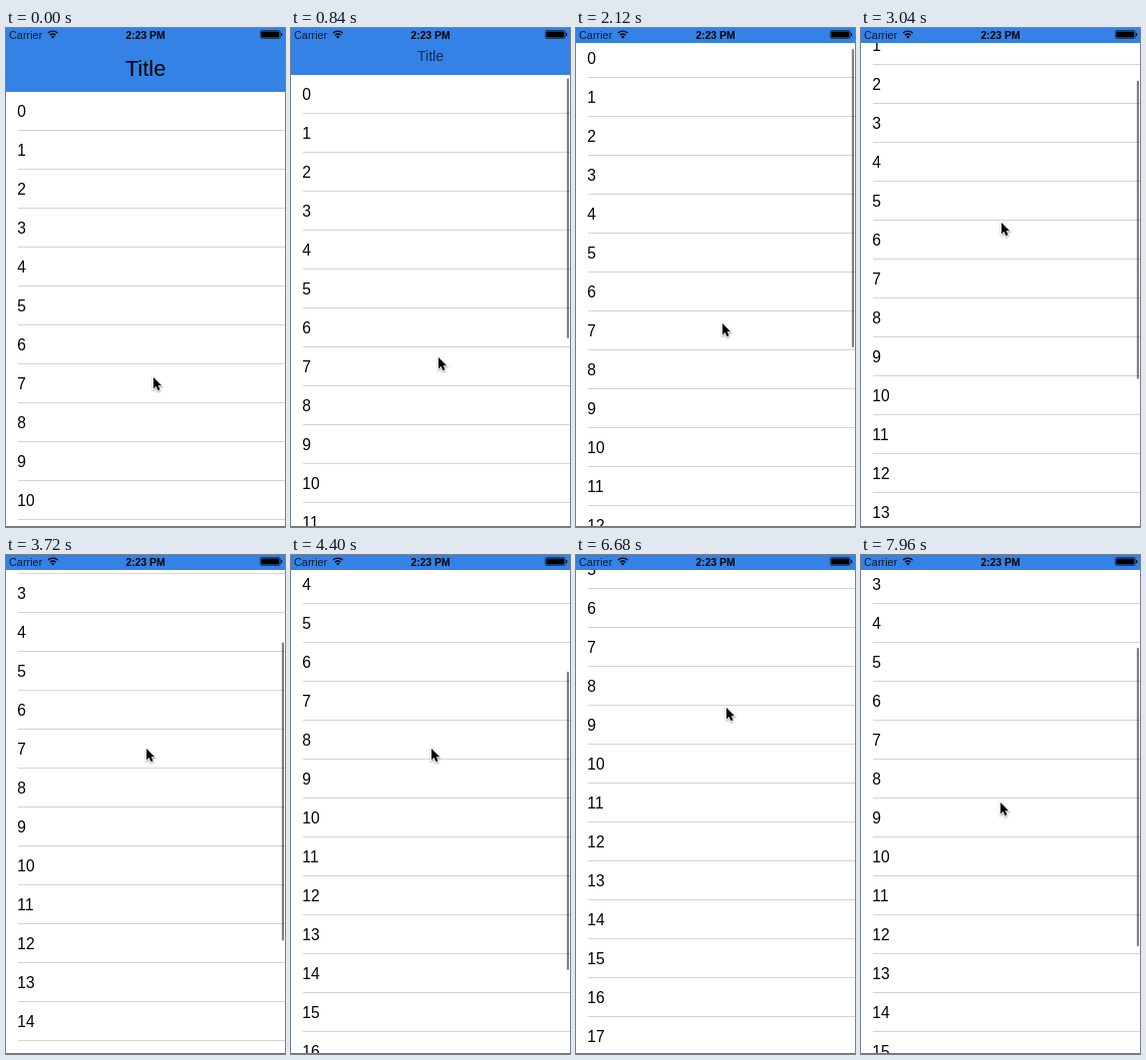
An HTML page with a canvas that plays this animation: 280 px wide and 500 px high, repeating every 8000 ms.

```html
<!DOCTYPE html>
<html lang="en">
<head>
<meta charset="utf-8">
<title>Collapsing title bar</title>
<style>
  html, body { margin: 0; width: 100%; height: 100%; overflow: hidden; background: #fff; }
  canvas { display: block; width: 280px; height: 500px; }
</style>
</head>
<body>
<canvas id="stage" width="280" height="500"></canvas>
<script>
const ctx = document.getElementById('stage').getContext('2d');
const WIDTH = 280, HEIGHT = 500, LOOP = 8000, STEP = 40;
const BAR_MAX = 64, BAR_MIN = 15, COLLAPSE = BAR_MAX - BAR_MIN;
const ROWS = 20, ROW_HEIGHT = 39;
const FONT = '"Liberation Sans", Arial, sans-serif';
const BLUE = '#3482e6';

// Each key: time, list scroll, pointer x, pointer y
const KEYS = [
  [0, 0, 148, 350], [840, 17, 148, 330], [2120, 53, 147, 296],
  [3040, 105, 141, 195], [4400, 210, 141, 194], [5440, 239, 151, 153],
  [5840, 257, 151, 153], [6240, 264, 151, 153], [7000, 264, 151, 153],
  [7960, 171, 140, 248]
];

// Monotone cubic interpolation through one column of KEYS
function track(column) {
  const slopes = KEYS.slice(1).map((k, i) => (k[column] - KEYS[i][column]) / (k[0] - KEYS[i][0]));
  const tangents = KEYS.map((_, i) => {
    if (i === 0) return slopes[0];
    if (i === slopes.length) return slopes[i - 1];
    const a = slopes[i - 1], b = slopes[i];
    return a * b <= 0 ? 0 : 2 * a * b / (a + b);
  });
  return time => {
    let i = 0;
    while (i < slopes.length - 1 && time > KEYS[i + 1][0]) i++;
    const span = KEYS[i + 1][0] - KEYS[i][0];
    const u = Math.min(1, (time - KEYS[i][0]) / span), v = 1 - u;
    return KEYS[i][column] * v * v * (1 + 2 * u) + KEYS[i + 1][column] * u * u * (3 - 2 * u)
      + span * u * v * (tangents[i] * v - tangents[i + 1] * u);
  };
}
const scrollAt = track(1), pointerX = track(2), pointerY = track(3);

const clamp = (x, lo, hi) => Math.max(lo, Math.min(hi, x));

function label(text, x, y, font, align = 'left', color = '#000') {
  ctx.font = `${font} ${FONT}`;
  ctx.textAlign = align;
  ctx.fillStyle = color;
  ctx.fillText(text, x, y);
}

function roundBox(x, y, w, h, r) {
  ctx.beginPath();
  ctx.roundRect(x, y, w, h, r);
}

function drawList(scroll) {
  for (let i = 0; i < ROWS; i++) {
    const top = 63 + i * ROW_HEIGHT - scroll;
    if (top > HEIGHT || top < -ROW_HEIGHT) continue;
    label(i, 11.3, top + 26, '15.75px');
    ctx.fillStyle = '#d3d3d5';
    ctx.fillRect(12, top + ROW_HEIGHT, WIDTH - 12, 1);
  }
}

function drawIndicator(scroll, bar, time) {
  const shown = time < 6400 ? clamp(time / 80, 0, 1)
    : time < 7040 ? clamp((6680 - time) / 240, 0, 1) : 1;
  const view = HEIGHT - bar;
  const length = view * view / (ROWS * ROW_HEIGHT) - 2.5;
  ctx.fillStyle = `rgba(0,0,0,${0.5 * shown})`;
  roundBox(276.8, bar + 3.5 + Math.max(0, scroll - COLLAPSE) * 0.61, 2.2, length, 1.1);
  ctx.fill();
}

function drawStatus() {
  label('Carrier', 3, 10.5, '10.9px', 'left', '#071a30');
  label('2:23 PM', 140, 10.5, 'bold 10.5px', 'center');

  // Wi-Fi
  ctx.strokeStyle = '#000';
  ctx.lineWidth = 1.3;
  for (const r of [4, 6.9]) {
    ctx.beginPath();
    ctx.arc(47, 10, r, -Math.PI * 0.75, -Math.PI * 0.25);
    ctx.stroke();
  }
  ctx.fillStyle = '#000';
  ctx.beginPath();
  ctx.moveTo(47, 10.4);
  ctx.arc(47, 10.4, 2.4, -Math.PI * 0.75, -Math.PI * 0.25);
  ctx.fill();

  // Battery
  ctx.lineWidth = 0.6;
  roundBox(255.3, 2.6, 19.8, 7.8, 1.4);
  ctx.stroke();
  roundBox(256.2, 3.5, 18, 6, 0.8);
  ctx.fill();
  roundBox(275.9, 5, 1.2, 3, 0.6);
  ctx.fill();
}

function drawBar(scroll, bar) {
  ctx.fillStyle = BLUE;
  ctx.fillRect(0, 0, WIDTH, bar);
  const size = 1 - clamp(scroll / COLLAPSE, 0, 1);
  if (size > 0) {
    ctx.globalAlpha = size;
    label('Title', 140, 40.2 - 0.71 * scroll + 7.8 * size, `${22 * size}px`, 'center');
    ctx.globalAlpha = 1;
  }
  drawStatus();
}

const arrow = new Path2D('M0 0V11.4L2.6 8.9 4.5 13.2 6.6 12.3 4.8 8.2H8.2Z');
function drawPointer(x, y) {
  ctx.save();
  ctx.translate(x, y);
  ctx.shadowColor = 'rgba(0,0,0,.4)';
  ctx.shadowBlur = 2;
  ctx.shadowOffsetY = 1;
  ctx.strokeStyle = '#fff';
  ctx.lineWidth = 1.6;
  ctx.stroke(arrow);
  ctx.shadowColor = 'transparent';
  ctx.fillStyle = '#000';
  ctx.fill(arrow);
  ctx.restore();
}

function draw(now) {
  const time = Math.floor((now % LOOP) / STEP) * STEP;
  const scroll = Math.round(scrollAt(time));
  const bar = clamp(BAR_MAX - scroll, BAR_MIN, BAR_MAX);
  ctx.fillStyle = '#fff';
  ctx.fillRect(0, 0, WIDTH, HEIGHT);
  drawList(scroll);
  drawIndicator(scroll, bar, time);
  drawBar(scroll, bar);
  ctx.fillStyle = '#777';
  ctx.fillRect(0, HEIGHT - 1, WIDTH, 1);
  drawPointer(Math.round(pointerX(time)), Math.round(pointerY(time)));
}

const start = performance.now();
function tick() {
  draw(performance.now() - start);
  requestAnimationFrame(tick);
}
tick();
</script>
</body>
</html>
```
